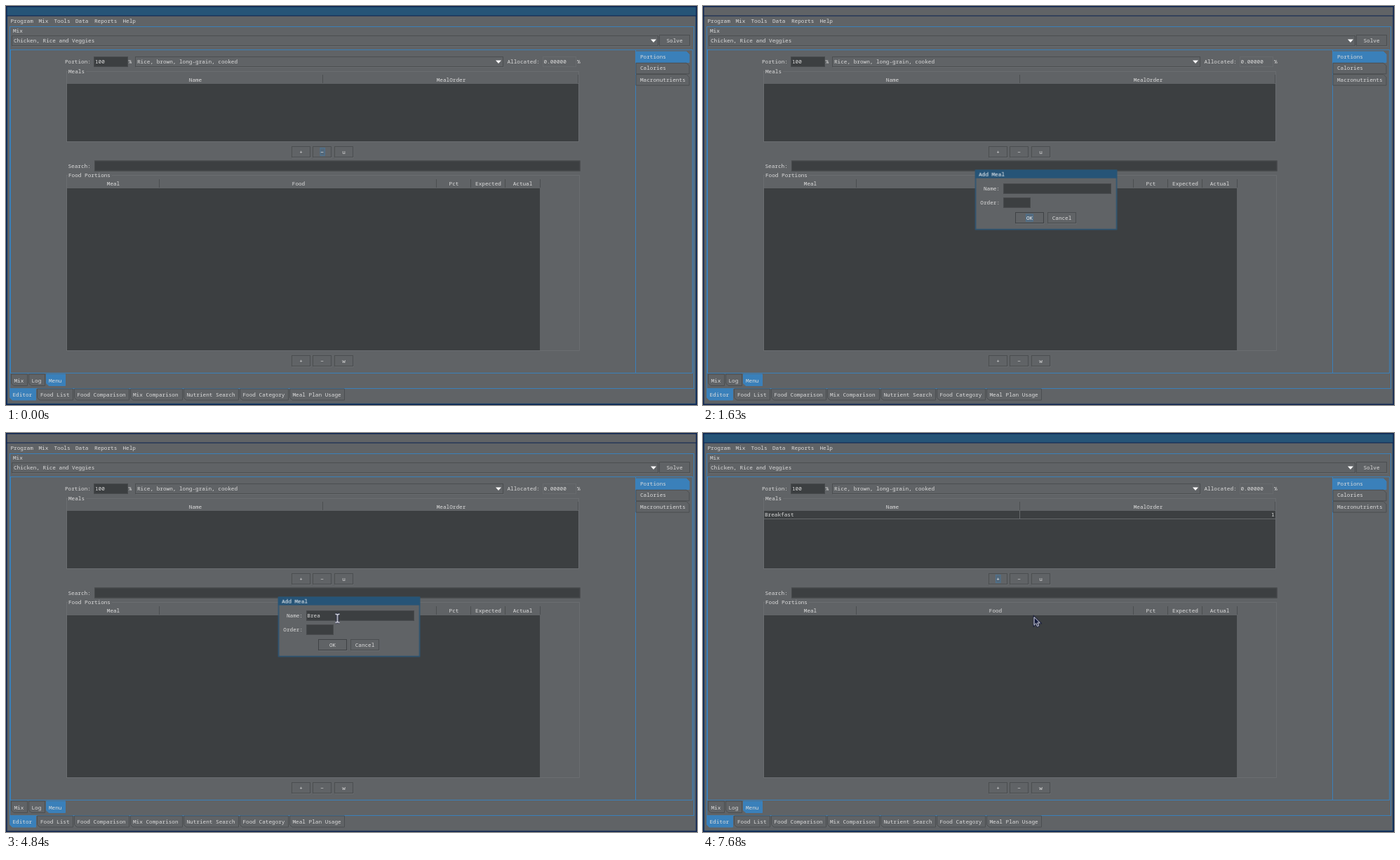
Write an HTML page that moves like this. It is 985 px wide and 569 px high and loops after 8 s.

```html
<!DOCTYPE html>
<html lang="en">
<head>
<meta charset="utf-8">
<title>Meal editor</title>
<style>
  html, body { margin: 0; width: 100%; height: 100%; overflow: hidden; background: #606366; }
  svg { display: block; width: 985px; height: 569px; }
  text { font: 7.7px "Noto Sans Mono", monospace; fill: #dcdcdc; white-space: pre; }
  .bright { fill: #fff; }
</style>
</head>
<body>
<script>
const LOOP = 8000, ADV = 4.62;
const BG = '#606366', DARK = '#3c3f41', EDGE = '#4b4e50', LIGHT = '#707376';
const BLUE = '#3a80ba', TITLE = '#265477', NAVY = '#0b2350';
let css = '', count = 0;

// Shapes; text y is the visual middle of the line.
const rect = (x, y, r, b, fill, more = '') =>
  `<rect x="${x}" y="${y}" width="${r - x}" height="${b - y}" fill="${fill}" ${more}/>`;
const frame = (x, y, r, b, color, w = 1) =>
  rect(x + .5, y + .5, r - .5, b - .5, 'none', `stroke="${color}" stroke-width="${w}"`);
const line = (x, y, r, b, color = EDGE, w = 1) =>
  `<path d="M${x} ${y}L${r} ${b}" stroke="${color}" stroke-width="${w}"/>`;
const text = (x, y, s, anchor = 'start', cls = '') =>
  `<text x="${x}" y="${y + 2.7}" text-anchor="${anchor}" class="${cls}">${s}</text>`;
const mid = (x, y, s) => text(x, y, s, 'middle');

// Widgets
const box = (x, y, r, b, fill = BG) =>
  rect(x, y, r, b, fill) + frame(x, y, r, b, EDGE) + line(x + 1, b + .5, r + 1, b + .5, LIGHT, .6);
const button = (x, y, r, b, s) => box(x, y, r, b) + mid((x + r) / 2, (y + b) / 2 + .5, s);
const field = (x, y, r, b) => rect(x, y, r, b, DARK) + frame(x, y, r, b, EDGE, .8);
const arrow = (x, y) => `<path d="M${x - 4} ${y - 2}h8l-4 4.5z" fill="#fff"/>`;
const combo = (x, y, r, b, s) => box(x, y, r, b) + text(x + 3, (y + b) / 2, s) + arrow(r - 7, (y + b) / 2);
const focus = (x, y, r, b) => rect(x, y, r, b, '#41729a', 'fill-opacity=".4"') + frame(x, y, r, b, '#4680ae', .4);
const tab = (x, y, r, b, s, tx, on) =>
  `<path d="M${x + .5} ${y}H${r - .5}V${b - .5}H${x + 4}l-3.5-3.5z" fill="${on ? BLUE : BG}" stroke="${on ? BLUE : EDGE}"/>` +
  text(tx, (y + b) / 2 + .5, s);
const buttons = (y, last) =>
  button(407, y, 434, y + 16, '+') + button(437, y, 464, y + 16, '−') + button(468, y, 495, y + 16, last);

// Wraps content in a group whose property jumps to each value at its time (ms).
function jump(content, prop, steps) {
  const name = 'k' + count++;
  const keys = steps.map(([t, v]) => `${t / LOOP * 100}%{${prop}:${v}}`).join('');
  const last = steps[steps.length - 1][1];
  css += `@keyframes ${name}{${keys}100%{${prop}:${last}}}.${name}{animation:${name} ${LOOP}ms step-end infinite}`;
  return `<g class="${name}">${content}</g>`;
}
// Visible between alternating on/off times.
function show(content, ...times) {
  const steps = times.map((t, i) => [t, i % 2 ? 0 : 1]);
  if (times[0] > 0) steps.unshift([0, 0]);
  return jump(content, 'opacity', steps);
}
const place = (content, steps) =>
  jump(content, 'transform', steps.map(([t, x, y]) => [t, `translate(${x}px,${y}px)`]));

function windowFrame() {
  const border = color => rect(1, 1, 984, 14, color) + frame(1, 1, 984, 568, color, 1.5);
  return rect(0, 0, 985, 569, BG) + border(TITLE) + show(border(BG), 1630, 7630) +
    frame(0, 0, 985, 569, NAVY, 2) + line(1, 14, 984, 14, NAVY) +
    [['Program', 6.5], ['Mix', 46.5], ['Tools', 68.5], ['Data', 99], ['Reports', 126], ['Help', 166.5]]
      .map(([s, x]) => text(x, 21, s)).join('') +
    frame(5, 29, 981, 546, BLUE) + text(10, 35, 'Mix') +
    combo(8, 42, 930, 57, 'Chicken, Rice and Veggies') + button(931, 41, 975, 57, 'Solve') +
    frame(6, 62, 979, 524, BLUE) + line(897.5, 63, 897.5, 523, BLUE);
}

function tabs() {
  const side = ['Portions', 'Calories', 'Macronutrients'].map((s, i) => {
    const y = 65 + i * 16.3, d = `M898 ${y}h72l4 4v11.5h-76z`;
    return `<path d="${d}" fill="${i ? BG : BLUE}" stroke="${i ? EDGE : BLUE}"/>` + text(904, y + 7.2, s);
  }).join('');
  const low = [['Editor', 5, 43, 9.5], ['Food List', 44, 96, 49], ['Food Comparison', 97, 176, 101.5],
    ['Mix Comparison', 177, 252, 181], ['Nutrient Search', 253, 332, 257.5],
    ['Food Category', 333, 403, 337.5], ['Meal Plan Usage', 404, 483, 408.5]];
  const high = [['Mix', 7, 31, 11.5], ['Log', 32, 56, 36.5], ['Menu', 57, 85, 61]];
  return side + high.map(([s, x, r, tx], i) => tab(x, 525, r, 542, s, tx, i === 2)).join('') +
    low.map(([s, x, r, tx], i) => tab(x, 546, r, 562.5, s, tx, i === 0)).join('');
}

function editor() {
  const divider = (x, y) => line(x + .5, y, x + .5, y + 12);
  const group = (y, b, r, s) => frame(86, y, r, b, LIGHT, .7) +
    rect(88, y - 3, 91 + s.length * ADV, y + 4, BG) + text(89, y, s);
  const grid = '#66696c';
  const row = text(88, 116.5, 'Breakfast') + text(814.5, 116.5, '1', 'end') +
    line(87, 122.5, 816, 122.5, grid) + line(451.5, 111, 451.5, 122, grid);
  return text(84, 79.5, 'Portion:') + field(125, 72, 174, 87) + text(127, 79.5, '100') + text(174.5, 79.5, '%') +
    combo(184, 72, 709, 87, 'Rice, brown, long-grain, cooked') +
    text(714.5, 79.5, 'Allocated:') + frame(765, 72, 813, 87, '#676a6d') +
    text(766.5, 79.5, '0.00000') + text(814, 79.5, '%') +
    group(93, 194, 817, 'Meals') + mid(270, 105, 'Name') + mid(634.5, 105, 'MealOrder') +
    divider(451, 98) + divider(815, 98) + rect(87, 111, 816, 193, DARK) + show(row, 7680) +
    buttons(200, 'u') +
    show(focus(447.5, 202, 455, 214) + mid(450.5, 208.5, '−'), 0, 1470) +
    show(rect(408, 201, 433, 215, '#6c7278'), 1470, 1630) +
    show(focus(417, 202, 424.5, 214) + mid(420.5, 208.5, '+'), 1470, 1630, 7630) +
    text(88.5, 228, 'Search:') + field(126, 220.5, 818.5, 235.5) +
    group(241, 492, 818, 'Food Portions') +
    [['Meal', 153], ['Food', 417], ['Pct', 638.5], ['Expected', 687.5], ['Actual', 736.5]]
      .map(([s, x]) => mid(x, 253.5, s)).join('') +
    [218, 613, 662, 711, 761].map(x => divider(x, 247)).join('') +
    rect(87, 260, 761, 491, DARK) + buttons(498, 'w') +
    show(rect(408, 217, 450, 228, TITLE) + frame(408, 217, 450, 228, BLUE, .8) + text(410.5, 222.5, 'Add Meal'), 500, 1470);
}

function dialog() {
  const typed = (word, keys, y) =>
    [...word].map((c, i) => show(text(429.3 + i * ADV, y, c), keys[i])).join('');
  const form = text(423, 260.5, 'Name:', 'end') + field(428, 253, 582, 268) +
    text(423, 280.5, 'Order:', 'end') + field(428, 273, 467, 288) +
    button(445, 294, 486, 310, 'OK') + frame(445, 294, 486, 310, '#3f4245') + button(491, 294, 532, 310, 'Cancel') +
    show(focus(460, 296.5, 471, 307.5) + mid(465.5, 302.5, 'OK'), 1630, 2450);
  const nameKeys = [3470, 4070, 4160, 4380, 5110, 5390, 5610, 5730, 5960];
  const orderKeys = [6620, 7350];
  const stops = [[0, 429, 255], ...nameKeys.map((t, i) => [t, 429.2 + (i + 1) * ADV, 255]),
    [6280, 429, 275], ...orderKeys.map((t, i) => [t, 429.2 + (i + 1) * ADV, 275])];
  const caret = show(place(rect(0, 0, 1, 10, '#e0e0e0'), stops),
    2450, 2920, 3470, 3980, 4070, 4840, 5110, 6280, 6320, 7060, 7350);
  const body = rect(388, 233.5, 590, 319, BG) + rect(388, 233.5, 590, 245.5, TITLE) +
    frame(388, 233.5, 590, 319, TITLE, 1.4) +
    text(393, 239.7, 'Add Meal', 'start', 'bright') +
    show(form + typed('Breakfast', nameKeys, 260.5) + typed('01', orderKeys, 280.5) + caret, 1630);
  return show(place(body, [[0, 1.5, 13.3], [1630, 0, 0]]), 1570, 7630);
}

function pointer() {
  const tip = 'M0 0V11.5L2.7 9 4.6 13.2 6.7 12.2 4.8 8.2H8.4Z';
  const bar = 'M-3-6Q0-6 0-4.5Q0-6 3-6M0-5V5M-3 6Q0 6 0 4.5Q0 6 3 6';
  const outlined = (d, fill, dark, white) =>
    `<path d="${d}" fill="none" stroke="#141a3c" stroke-width="${dark}"/>` +
    `<path d="${d}" fill="${fill}" stroke="#fff" stroke-width="${white}"/>`;
  const path = (start, x, y, toX, toY) => Array.from({length: 6}, (_, i) =>
    [start + i * 48, x + (toX - x) * i / 5, y + (toY - y) * i / 5]);
  const steps = [[0, 456, 232], ...path(2010, 456, 232, 479, 257.3),
    ...path(2450, 479, 257.3, 472.5, 264.3), [7630, 472, 262.5]];
  return place(show(outlined(tip, '#141a3c', 2.6, .9), 2010, 2202, 7630) +
    show(outlined(bar, 'none', 3, 1.3), 2202, 7630), steps);
}

const scene = windowFrame() + tabs() + editor() + dialog() + pointer();
document.body.innerHTML = `<style>${css}</style><svg viewBox="0 0 985 569">${scene}</svg>`;
</script>
</body>
</html>
```
